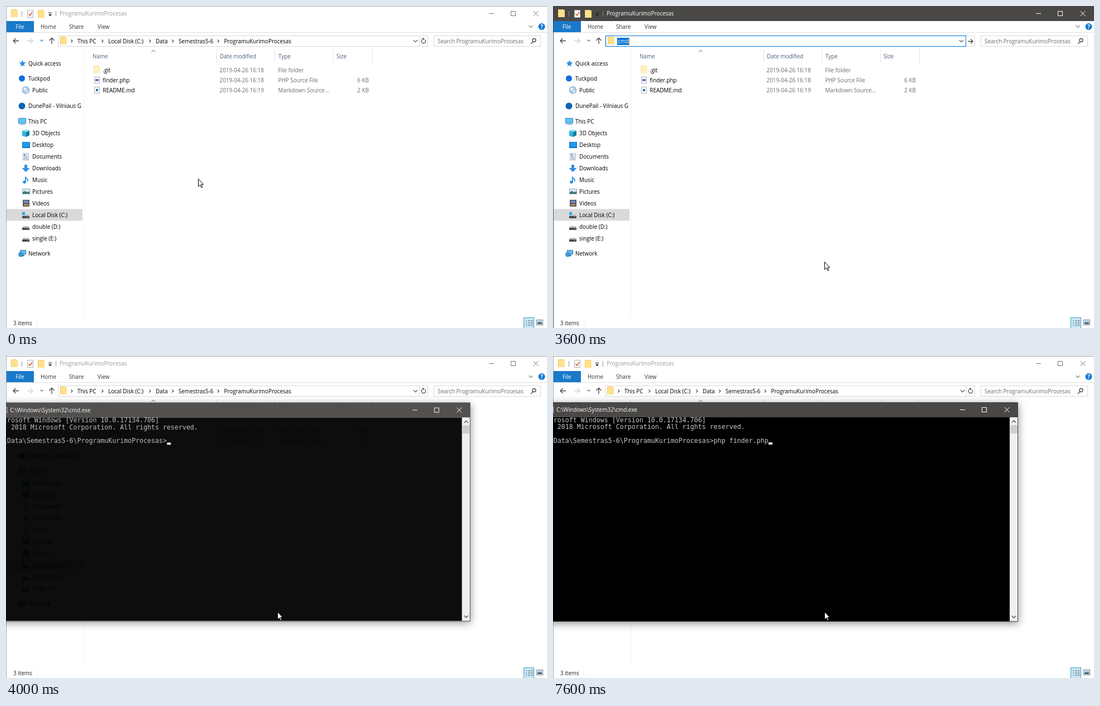
Animation of 969x578 px, one loop 8000 ms. Source, as an HTML page with a canvas:

```html
<!DOCTYPE html>
<html lang="en">
<head>
<meta charset="utf-8">
<title>Explorer to command prompt</title>
<style>
  html, body { margin: 0; width: 100%; height: 100%; overflow: hidden; background: #fff; }
  canvas { display: block; }
</style>
</head>
<body>
<canvas id="stage" width="969" height="578"></canvas>
<script>
const g = document.getElementById('stage').getContext('2d');
const LOOP = 8000;
const UI = '9.9px "Open Sans", "Noto Sans", sans-serif';
const MONO = '11.63px "DejaVu Sans Mono", monospace';
const DARK = '#4a4846', GREY = '#6d6d6d', BLUE = '#0078d7';
const FOLDER = 'ProgramuKurimoProcesas';

const box = (x, y, w, h, color) => { g.fillStyle = color; g.fillRect(x, y, w, h); };
const frame = (x, y, w, h, color) => {
  g.strokeStyle = color; g.lineWidth = 1;
  g.strokeRect(x + .5, y + .5, w - 1, h - 1);
};
const line = (d, color, width = 1) => {
  g.strokeStyle = color; g.lineWidth = width; g.stroke(new Path2D(d));
};
const shape = (d, color) => { g.fillStyle = color; g.fill(new Path2D(d)); };
const disc = (x, y, r, color) => {
  g.fillStyle = color; g.beginPath(); g.arc(x, y, r, 0, 7); g.fill();
};
const label = (s, x, y, color = '#000', font = UI, align = 'left') => {
  g.font = font; g.fillStyle = color; g.textAlign = align; g.fillText(s, x, y);
};
const chevron = (x, y, color, dx = 3.5, dy = 3.5) =>
  line(`M${x - dx} ${y - dy / 2}L${x} ${y + dy / 2}L${x + dx} ${y - dy / 2}`, color, 1.2);
const within = (t, from, to) => t >= from && t < to;
// Latest value whose start time has been reached.
const latest = (t, steps) => steps.filter(s => s[0] <= t).pop()[1];

function folder(x, y, w = 12, h = 14, front = '#ffe08c', back = '#f3ca62') {
  box(x, y, w - 2, h, back);
  box(x + 1, y + 1, w - 1, h - 1, front);
}

function page(x, y, w = 10, h = 12) {
  box(x, y, w, h, '#fff');
  frame(x, y, w, h, '#a9b0b8');
}

function controls([minimize, maximize, close], y, color) {
  box(minimize - 5, y, 9, 1, color);
  frame(maximize - 5, y - 4, 9, 9, color);
  line(`M${close - 4.5} ${y - 4}l9 9m0-9l-9 9`, color);
}

function titleBar(active) {
  box(0, 0, 969, 27, active ? DARK : '#fff');
  if (!active) box(0, 0, 969, 1, '#aaa');
  folder(9, 6);
  box(28, 9, 1, 10, active ? '#888' : '#999');
  page(38, 7, 11, 14);
  line('M40.500 14l2.500 3 4-6', '#d8502f', 1.5);
  folder(57, 7);
  const arrow = active ? '#161514' : '#000';
  box(76, 12, 6, 1, arrow);
  shape('M76 15h6l-3 3z', arrow);
  box(89, 9, 1, 10, active ? '#888' : '#999');
  label(FOLDER, 96, 17.3, active ? '#fff' : '#999');
  controls([870, 909, 949], 13, active ? '#fff' : '#777');
}

function ribbon() {
  box(1, 27, 49, 20, '#1979ca');
  label('File', 17, 41, '#fff');
  [['Home', 62], ['Share', 113], ['View', 164]].forEach(([s, x]) => label(s, x, 41, '#333'));
  box(1, 47, 968, 1, '#dedfe0');
  chevron(940, 37, '#888');
  disc(959.5, 37, 6, '#1377d1');
  label('?', 959.5, 40.6, '#fff', 'bold ' + UI, 'center');
}

// Selected text in the edit field; returns its right edge.
function highlight(text, x) {
  g.font = UI;
  const w = Math.round(g.measureText(text).width) + 2;
  box(x, 57, w, 13, BLUE);
  label(text, x + 1, 66.6, '#fff');
  return x + w;
}

function addressBar(t) {
  const editing = within(t, 2200, 3800);
  line('M13 62.500h10M17.500 58l-4.500 4.500 4.500 4.500', '#444', 1.3);
  line('M38 62.500h10M43.500 58l4.500 4.500-4.500 4.500', '#d0d0d0', 1.3);
  chevron(64, 62, t < 100 ? '#1e90e8' : '#777', 2.5, 2.5);
  line('M82 68V57.500M77.500 62l4.500-4.500 4.500 4.500', '#444', 1.3);
  frame(93, 53, 663, 20, '#d9d9d9');
  folder(editing ? 98 : 97, 55);

  if (editing) {
    frame(94, 53, 646, 20, BLUE);
    chevron(731.5, 63, '#555');
    if (t < 3000) {
      highlight('C:\\Data\\Semestras5-6\\' + FOLDER, 115);
      if (t < 2700) box(262, 57, 1, 13, '#ff8728');
    } else if (t < 3600) {
      const typed = latest(t, [[3000, 'c'], [3100, 'cm'], [3300, 'cmd']]);
      label(typed, 116, 66.6);
      box(Math.round(116 + g.measureText(typed).width), 57, 1, 13, '#000');
    } else {
      box(highlight('cmd', 115) - 1, 57, 1, 13, '#ff8728');
    }
  } else {
    box(740, 54, 1, 18, '#d9d9d9');
    [['This PC', 128], ['Local Disk (C:)', 183], ['Data', 268], ['Semestras5-6', 309], [FOLDER, 390.5]]
      .forEach(([s, x]) => {
        label(s, x, 66.6);
        line(`M${x - 11.5} 60.500l2.500 2.500-2.500 2.500`, '#444', 1.1);
      });
    chevron(733.5, 63, '#555');
  }

  if (within(t, 3000, 3800)) line('M743 63.500h9M748 59.500l4 4-4 4', '#444', 1.3);
  else {
    line('M750.500 60.500a3.700 3.700 0 1 1-4-.8', '#555', 1.3);
    shape('M745 57.500h4v4z', '#555');
  }
  frame(766, 53, 192, 20, '#d9d9d9');
  label('Search ' + FOLDER, 773, 66.6, GREY);
  line('M943.500 64.500l-3.500 3.500M949 61.500a3 3 0 1 1-6 0a3 3 0 1 1 6 0', '#444', 1.3);
}

function suggestions(t) {
  const typed = t < 3300 ? 'cm' : 'cmd';
  box(115, 73, 610, 48, '#fff');
  frame(115, 73, 610, 48, '#a0a0a0');
  label('cmd', 119, 88);
  label(`Search for "${typed}"`, 119, 111);
}

const drive = y => {
  shape(`M31 ${y}h9l2 3h-13z`, '#c4c4c4');
  box(29, y + 3, 13, 4, '#4a4a4a');
  box(38, y + 4, 2, 1, '#6fe06f');
};

// Each entry: text, x, centre y, icon painter.
const places = [
  ['Quick access', 40, 103, y => shape(`M29.500 ${y - 6}l1.700 4 4.300.4-3.300 2.800 1 4.300-3.700-2.300-3.700 2.300 1-4.300-3.300-2.800 4.300-.4z`, '#2e8fdd')],
  ['Tuckpod', 40, 130.5, y => disc(28.5, y, 5.5, '#0d6fe0')],
  ['Public', 47, 151.5, y => {
    disc(35.5, y, 6.8, '#7fa9d3');
    disc(35.5, y, 5.8, '#a9cbea');
    shape(`M31 ${y - 3}l4-2 2 3-3 3-2 0zM36 ${y + 1}l4-1-2 5-2 0z`, '#e6f1f5');
  }],
  ['DunePail - Vilniaus G', 40, 179.5, y => disc(28.5, y + .5, 6, '#0a64b4')],
  ['This PC', 40, 207, y => {
    box(22, y - 6, 14, 10, '#3a8ec9');
    box(23, y - 5, 12, 8, '#62c3f4');
    box(25, y + 5, 9, 1, '#5c7d94');
  }],
  ['3D Objects', 47, 228, y => {
    shape(`M29 ${y - 4}l7-2 6 2v8l-6 3-7-2z`, '#35b4d8');
    shape(`M36 ${y - 2}l6-2v8l-6 3z`, '#147c9e');
    shape(`M29 ${y - 4}l7-2 6 2-6 2z`, '#8ce0f2');
  }],
  ['Desktop', 47, 249, y => {
    box(29, y - 5, 14, 11, '#1674bd');
    box(30, y - 4, 12, 8, '#1e9bf0');
  }],
  ['Documents', 47, 270, y => {
    page(30, y - 6, 11, 13);
    box(32, y - 4, 3, 3, '#4c8fc7');
    [-3, 0, 2, 4].forEach(d => box(d < 0 ? 36 : 32, y + d, d < 0 ? 3 : 7, 1, '#6c9cc4'));
  }],
  ['Downloads', 47, 291, y => shape(`M33 ${y - 6}h5v6h4.500l-7 7-7-7h4.500z`, '#2f8fe0')],
  ['Music', 47, 312, y => {
    line(`M35 ${y - 6}v10M35 ${y - 5}q1 3 3.500 4.500q1.500 2 0 4`, '#1c86d8', 1.6);
    disc(33, y + 4, 2.6, '#1c86d8');
  }],
  ['Pictures', 47, 333, y => {
    box(29, y - 5, 14, 10, '#9aa7b2');
    box(30, y - 4, 12, 8, '#d6ecfa');
    shape(`M30 ${y + 4}v-3l4-2 3 2 5-1v4z`, '#3c7a78');
  }],
  ['Videos', 47, 354, y => {
    box(30, y - 6, 12, 12, '#333');
    box(32, y - 5, 8, 5, '#6a8fc4');
    box(32, y + 1, 8, 4, '#a98768');
    for (let i = -5; i < 6; i += 2) { box(30.5, y + i, 1, 1, '#ddd'); box(40.5, y + i, 1, 1, '#ddd'); }
  }],
  ['Local Disk (C:)', 47, 375, y => { drive(y - 1); box(29, y - 5, 5, 5, '#19b0e8'); }],
  ['double (D:)', 47, 396, y => drive(y - 1)],
  ['single (E:)', 47, 417, y => drive(y - 1)],
  ['Network', 40, 444.5, y => {
    box(25, y - 6, 11, 8, '#2f7fb5');
    box(26, y - 5, 9, 6, '#63bdf0');
    disc(26.5, y + 2, 4.5, '#3a9ad4');
    box(29, y + 3, 4, 2, '#4b6c80');
  }],
];

function sidebar() {
  box(1, 364.4, 136, 20.9, '#d9d9d9');
  box(139, 78, 1, 481, '#f3f3f3');
  g.save();
  g.beginPath(); g.rect(0, 78, 137, 480); g.clip();
  for (const [s, x, y, icon] of places) { icon(Math.floor(y)); label(s, x, y + 3.6); }
  g.restore();
}

function fileList(t) {
  line('M260.500 82.500l3.500-3.500 3.500 3.500', '#666');
  [377, 481, 586, 656].forEach(x => box(x, 78, 1, 23, '#e5e5e5'));
  [['Name', 155], ['Date modified', 383], ['Type', 488], ['Size', 592]]
    .forEach(([s, x]) => label(s, x, 93.6, '#4c607a'));
  folder(157, 107, 12, 14, '#fff0c2', '#f8e3a4');
  page(158, 127);
  box(160, 131, 6, 4, '#8068b0');
  page(158, 145);
  box(161, 149, 4, 4, '#2f6f9f');
  [['.git', '18', 'File folder', ''], ['finder.php', '18', 'PHP Source File', '6 KB'],
   ['README.md', '19', 'Markdown Source...', '2 KB']].forEach(([name, min, type, size], i) => {
    const y = 118.5 + i * 18.4;
    label(name, 173.3, y);
    label('2019-04-26 16:' + min, 382.5, y, GREY);
    label(type, 487.5, y, GREY);
    label(size, 650, y, GREY, UI, 'right');
  });
  if (within(t, 2000, 2200)) frame(153, 142, 500, 19, '#8ac6ee');
}

function statusBar() {
  label('3 items', 13, 573, '#222');
  box(55, 563, 1, 12, '#eee');
  box(927, 559, 19, 19, '#cce8f6');
  frame(927, 559, 19, 20, '#3fa0c0');
  for (let y = 564; y < 574; y += 3) {
    [931, 935, 940].forEach((x, i) => box(x, y, i ? 4 : 2, 1, '#5b7484'));
  }
  frame(950, 563, 12, 10, '#777');
  box(952, 565, 8, 6, '#9fc6e4');
  box(952, 568, 8, 3, '#3b5f78');
}

function consoleWindow(t) {
  const [alpha, scale] = latest(t, [[3800, [.25, .955]], [3900, [.72, .986]], [4000, [.95, .997]], [4100, [1, 1]]]);
  g.save();
  g.translate(406, 279.5); g.scale(scale, scale); g.translate(-406, -279.5);
  g.globalAlpha = alpha;
  // Clip to the outside so that only the shadow of this box is painted.
  g.save();
  g.beginPath();
  g.rect(-60, 0, 1100, 620); g.rect(-21, 83, 854, 394);
  g.clip('evenodd');
  g.shadowColor = 'rgba(0,0,0,.45)'; g.shadowBlur = 14; g.shadowOffsetY = 3;
  box(-21, 83, 854, 394, '#000');
  g.restore();
  box(-21, 83, 854, 27, DARK);
  box(-21, 110, 839, 366, '#000');
  box(818, 110, 14, 366, '#f0f0f0');
  box(832, 110, 1, 366, DARK);
  box(-21, 476, 854, 1, DARK);

  frame(-11, 91, 12, 11, '#ccc');
  label('C:\\Windows\\System32\\cmd.exe', 6, 100.3, '#fff');
  controls([734, 773, 813], 96, '#fff');
  box(819, 124, 13, 15, '#cdcdcd');
  line('M822 119.500l3.500-3.500 3.500 3.500M822 466.500l3.500 3.500 3.500-3.500', '#505050', 1.4);

  const typed = latest(t, [[0, ''], [5800, 'p'], [5900, 'ph'], [6000, 'php'], [6700, 'php '],
    [7300, 'php f'], [7400, 'php fi'], [7500, 'php fin'], [7600, 'php finder.php']]);
  const left = -20.3, ink = '#c8c8c8';
  label('Microsoft Windows [Version 10.0.17134.706]', left, 119, ink, MONO);
  label('(c) 2018 Microsoft Corporation. All rights reserved.', left, 131.3, ink, MONO);
  label(`C:\\Data\\Semestras5-6\\${FOLDER}>${typed}`, left, 156, ink, MONO);
  const blinkedOff = within(t, 4900, 5400) || within(t, 6400, 6700) || within(t, 7000, 7300);
  if (!blinkedOff) box(288 + typed.length * 7, 155, 7, 4, '#f2f2f2');
  g.restore();
}

function pointer(t) {
  if (within(t, 3300, 3600)) return;
  const [x, y] = latest(t, [[0, [344, 310]], [100, [440, 411]], [200, [486, 459]]]);
  const d = `M${x + .5} ${y + .5}v13.500l3.200-3 2.200 5 2-.9-2.200-4.800h4z`;
  shape(d, '#fff');
  line(d, '#000');
}

function draw(now) {
  const t = now % LOOP, active = within(t, 2000, 3800);
  box(0, 0, 969, 578, '#fff');
  titleBar(active);
  box(0, 0, 1, 578, active ? DARK : '#aaa');
  ribbon();
  addressBar(t);
  sidebar();
  fileList(t);
  statusBar();
  if (within(t, 3100, 3600)) suggestions(t);
  if (t >= 3800) consoleWindow(t);
  pointer(t);
  requestAnimationFrame(draw);
}
requestAnimationFrame(draw);
</script>
</body>
</html>
```
